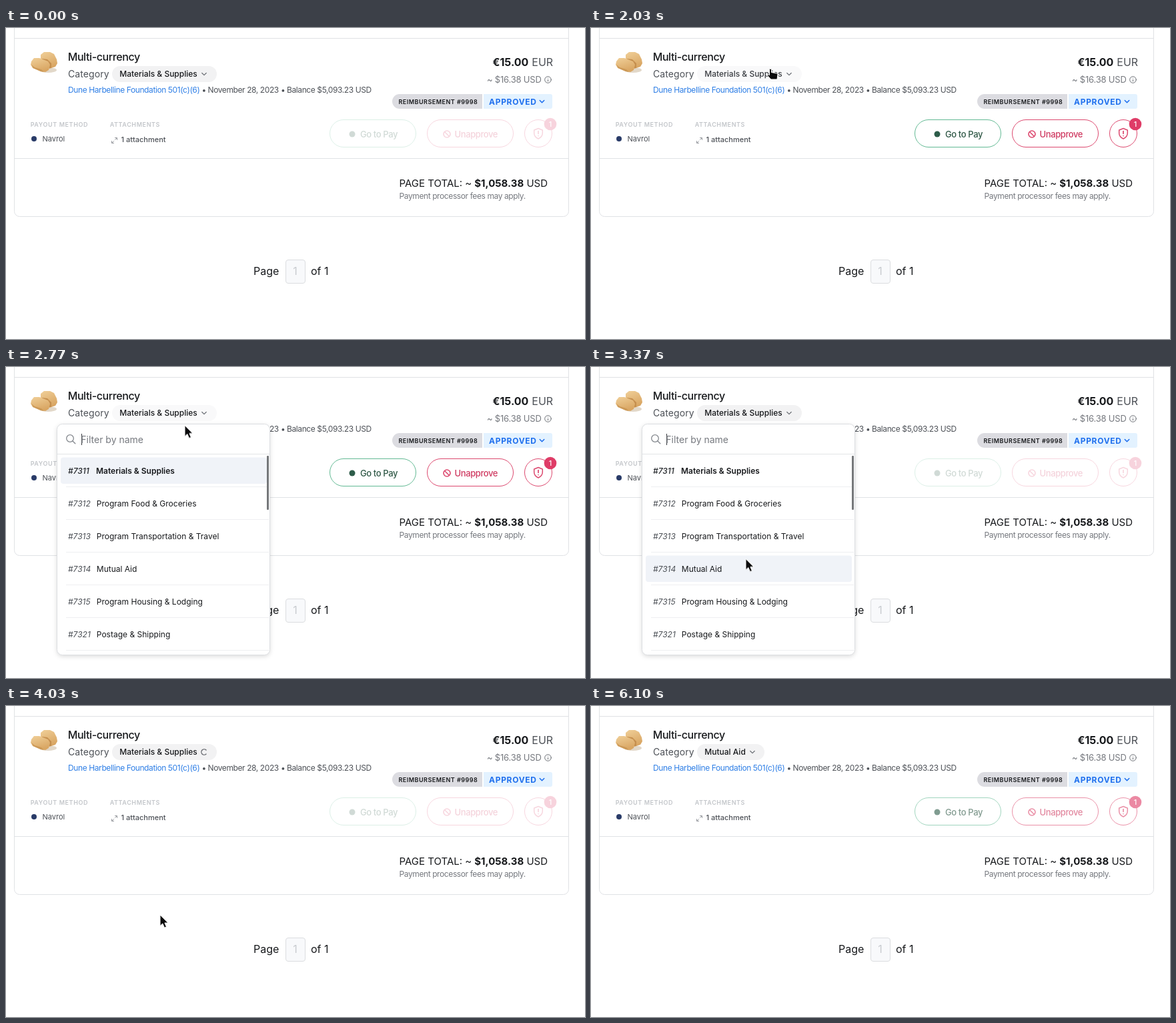
These frames come from a looping animation (868x466 px, 6.17 s). An HTML page:

```html
<!DOCTYPE html>
<html lang="en">
<head>
<meta charset="utf-8">
<title>Expense category</title>
<style>
html, body { margin: 0; width: 100%; height: 100%; overflow: hidden; background: #fff; }
svg { display: block; width: 868px; height: 466px; font-family: Inter, "Liberation Sans", sans-serif; fill: #17191c; }
text { white-space: pre; }
.s9 { font-size: 9px; font-weight: 600; }
.s11 { font-size: 11px; }
.s12 { font-size: 12px; }
.s13 { font-size: 13px; }
.s14 { font-size: 14px; }
.s15 { font-size: 15px; }
.s16 { font-size: 16px; }
.tight { letter-spacing: -.4px; }
.med { font-weight: 500; }
.semi { font-weight: 600; }
.bold { font-weight: 700; }
.grey { fill: #4d5157; }
.soft { fill: #76797f; }
.label { fill: #c3c6ca; letter-spacing: .6px; }
.line { fill: none; stroke: #e0e2e5; }
.icon { fill: none; stroke-linecap: round; stroke-linejoin: round; }
.red { fill: none; stroke: #dc486e; }
.redText { fill: #cf3a61; }
.code { font-style: italic; fill: #4d5157; }

/* every part shares one 6.17 s clock */
.a { animation: 6.17s step-end infinite; }
.buttons { animation-name: fade; }
.wide { animation-name: wide; }
.pill { fill: #f2f2f3; animation-name: pill; }
.press { animation-name: press; }
.chev { animation-name: chev; }
.load { animation-name: load; }
.spin { animation-name: spin; animation-timing-function: linear; }
.next { animation-name: next; }
.menu { animation-name: menu; }
.hover { fill: #f0f3f8; animation-name: hover; }
.move { animation-name: move; }
.arrow { animation-name: arrow; }
.hand { animation-name: hand; }

@keyframes fade {
  0% { opacity: .22; }
  23.1% { opacity: .22; animation-timing-function: steps(4); }
  27.5% { opacity: 1; }
  45.8% { opacity: 1; animation-timing-function: steps(7); }
  53.4% { opacity: .22; }
  69.65% { opacity: .22; animation-timing-function: steps(3); }
  72.9% { opacity: 1; }
  96.74% { opacity: .85; }
  98.85%, 100% { opacity: .6; }
}
@keyframes wide { 0% { opacity: 1; } 70.8%, 100% { opacity: 0; } }
@keyframes next { 0% { opacity: 0; } 70.8%, 100% { opacity: 1; } }
@keyframes pill { 0% { fill: #f2f2f3; } 27.5% { fill: #f9f9fa; } 52.3%, 100% { fill: #f2f2f3; } }
@keyframes press { 0% { fill: #17191c; } 32.88% { fill: #3a3d42; } 36.13%, 100% { fill: #17191c; } }
@keyframes chev { 0% { opacity: 1; } 61%, 100% { opacity: 0; } }
@keyframes load { 0% { opacity: 0; } 61%, 100% { opacity: 1; } }
@keyframes spin { from { transform: rotate(-81deg); } to { transform: rotate(2799deg); } }
@keyframes menu {
  0% { opacity: 0; }
  36.13% { opacity: .5; }
  37.26% { opacity: .88; }
  38.4% { opacity: 1; }
  59.95% { opacity: .5; }
  61%, 100% { opacity: 0; }
}
@keyframes hover {
  0% { transform: none; }
  49.2% { transform: translateY(49px); }
  50.25% { transform: translateY(98px); }
  52.3%, 100% { transform: translateY(147px); }
}
@keyframes move {
  0% { transform: translate(250px, 351px); }
  21.06% { transform: translate(250px, 351px); animation-timing-function: steps(6); }
  27.5% { transform: translate(268px, 61px); }
  44.88% { transform: translate(268px, 87.5px); animation-timing-function: steps(7); }
  52.3% { transform: translate(232px, 287.5px); }
  59.95% { transform: translate(232px, 287.5px); animation-timing-function: steps(5); }
  65.3%, 100% { transform: translate(231px, 313px); }
}
@keyframes arrow {
  0% { opacity: 0; }
  21.06% { opacity: 1; }
  27.5% { opacity: 0; }
  44.88% { opacity: 1; }
  96.74%, 100% { opacity: 0; }
}
@keyframes hand { 0% { opacity: 0; } 27.5% { opacity: 1; } 44.88%, 100% { opacity: 0; } }
</style>
</head>
<body>
<svg viewBox="0 0 868 466">
  <defs>
    <linearGradient id="crust" x1="0" y1="0" x2=".4" y2="1">
      <stop offset="0" stop-color="#f0cf98"/>
      <stop offset="1" stop-color="#d9a663"/>
    </linearGradient>
    <path id="chevron" class="icon" d="M-3.2-1.5L0 1.7 3.2-1.5"/>
  </defs>

  <path class="line" d="M12.5 0V274.500a8 8 0 0 0 8 8H835.500a8 8 0 0 0 8-8V0M13 15.500H843M13 195.500H843"/>

  <ellipse cx="63" cy="63" rx="13" ry="4" fill="#e2d8c9"/>
  <path fill="url(#crust)" d="M52 40l5-4 9 0 6 3 4 8 1 6-3 5-9 3-13-12z"/>
  <path fill="#c58f4e" d="M54 46l8 1 6 6 0 7-5 0-9-8z"/>
  <path fill="url(#crust)" d="M38 50l4-5 8 0 13 5 3 5-2 8-5 3-7-1-12-5-3-5z"/>
  <path fill="#cc9957" d="M38 55l5 4 10 3 4 4-5-1-11-5z"/>

  <text class="s16 med tight" x="92.700" y="49">Multi-currency</text>
  <text class="s14 grey" x="93" y="74" letter-spacing=".1">Category</text>

  <g class="a wide">
    <rect class="a pill" x="159" y="57" width="157" height="24" rx="12"/>
    <text class="a press s12 med" x="170.300" y="73">Materials &amp; Supplies</text>
    <g class="a chev"><use href="#chevron" x="297" y="69" stroke="#6b6f75" stroke-width="1.200"/></g>
    <g class="a load"><g transform="translate(297 69)">
      <path class="a spin icon" d="M3-3A4.200 4.200 0 1 0 3 3" stroke="#5d6066" stroke-width="1.300"/>
    </g></g>
  </g>
  <g class="a next">
    <rect x="159" y="57" width="101" height="24" rx="12" fill="#f2f2f3"/>
    <text class="s12 med" x="170.300" y="73">Mutual Aid</text>
    <use href="#chevron" x="242" y="69" stroke="#6b6f75" stroke-width="1.200"/>
  </g>

  <g class="s12 tight grey">
    <text x="93" y="97" fill="#2f7fe6">Dune Harbelline Foundation 501(c)(6)</text>
    <text x="293.500" y="97">•</text>
    <text x="302.500" y="97">November 28, 2023</text>
    <text x="412" y="97">•</text>
    <text x="421" y="97">Balance $5,093.23 USD</text>
  </g>

  <text class="s16 bold" x="729.500" y="57">€15.00</text>
  <text class="s16 grey" x="788.300" y="57">EUR</text>
  <text class="s13 soft" x="721" y="82" letter-spacing="-.2">~ $16.38 USD</text>
  <g class="icon" stroke="#6a6e74">
    <circle cx="812.500" cy="77.500" r="4.800"/>
    <path d="M812.500 77.500v2.300M812.500 75.100v.1"/>
  </g>

  <path fill="#dcdce1" d="M714 99v22H590a11 11 0 0 1 0-22z"/>
  <text class="s9" x="588.400" y="114" letter-spacing=".5">REIMBURSEMENT #9998</text>
  <path fill="#e3f2ff" d="M716 99H816a3 3 0 0 1 3 3V118a3 3 0 0 1-3 3H716z"/>
  <text class="s12 bold" x="724" y="115" fill="#2070ee" letter-spacing=".7">APPROVED</text>
  <use href="#chevron" x="803.500" y="110" stroke="#2070ee" stroke-width="1.600"/>

  <text class="s9 label" x="36.700" y="148">PAYOUT METHOD</text>
  <text class="s9 label" x="155.700" y="148">ATTACHMENTS</text>
  <circle cx="42" cy="166" r="4" fill="#293b68"/>
  <text class="s11 grey" x="54.500" y="170.300">Navrol</text>
  <path class="icon" stroke="#96999e" d="M163.500 164.500H166.500V167.500M166 165L163.500 167.500M158.500 169.500V172.500H161.500M159 172L161.500 169.500"/>
  <text class="s11 med grey" x="172.500" y="171">1 attachment</text>

  <g class="a buttons">
    <rect x="485.500" y="137.500" width="129" height="41" rx="20.500" fill="none" stroke="#62b993"/>
    <circle cx="519" cy="159" r="4.500" fill="#2d5c49"/>
    <text class="s13 med tight" x="531" y="164" fill="#305947">Go to Pay</text>

    <rect class="red" x="631.500" y="137.500" width="129" height="41" rx="20.500"/>
    <circle class="red" cx="661" cy="159" r="5" stroke-width="1.600"/>
    <path class="red" d="M657.500 155.500l7 7" stroke-width="1.600"/>
    <text class="s13 med tight redText" x="672.500" y="164">Unapprove</text>

    <circle class="red" cx="798" cy="158" r="20.500"/>
    <path class="red" stroke-width="1.500" stroke-linejoin="round" d="M798 150.500l6.300 2.500v4.500q0 5.500-6.300 8.500-6.300-3-6.300-8.500V153z"/>
    <path class="icon" stroke="#d93a64" stroke-width="1.600" d="M798 154.500v4M798 161.500v.1"/>
    <circle cx="816" cy="144" r="9.300" fill="#df3c67"/>
    <text class="s11 med" x="816" y="148" fill="#fff" text-anchor="middle">1</text>
  </g>

  <text class="s15" x="589.500" y="238">PAGE TOTAL: ~</text>
  <text class="s15 bold" x="702.300" y="238">$1,058.38</text>
  <text class="s15" x="780.400" y="238">USD</text>
  <text class="s12 tight soft" x="589.500" y="256">Payment processor fees may apply.</text>

  <g class="s16">
    <text x="371" y="370">Page</text>
    <rect x="419.500" y="347.500" width="29" height="35" rx="3.500" fill="#f8f9fb" stroke="#dbdde0"/>
    <text x="433.500" y="370" fill="#c8cbcf" text-anchor="middle">1</text>
    <text x="457" y="370">of 1</text>
  </g>

  <g class="a menu">
    <rect x="76.500" y="85.500" width="319" height="346" rx="8" fill="#fff" stroke="#dcdee1" style="filter:drop-shadow(0 2px 3px #0002)"/>
    <g class="icon" stroke="#83878d" stroke-width="1.300">
      <circle cx="96" cy="107" r="5.300"/>
      <path d="M100 111l3.800 3.800"/>
    </g>
    <path stroke="#33363a" d="M113.500 100V117"/>
    <text class="s14 soft" x="112.300" y="114">Filter by name</text>
    <path class="line" stroke-width=".9" d="M77 130.500H395"/>
    <path fill="none" stroke="#eeeff1" d="M90 179.500H394M90 228.500H394M90 277.500H394M90 326.500H394M90 375.500H394M90 424.500H394"/>
    <rect class="a hover" x="82" y="135.500" width="309" height="39.500" rx="4"/>
    <rect x="391" y="133" width="3" height="81" rx="1" fill="#75777a"/>
    <g class="s12">
      <text class="code med" x="93" y="160" style="fill:#24272b">#7311</text>
      <text class="semi" x="135" y="160">Materials &amp; Supplies</text>
      <text class="code" x="93" y="209">#7312</text>
      <text x="135.800" y="209">Program Food &amp; Groceries</text>
      <text class="code" x="93" y="258">#7313</text>
      <text x="135.800" y="258">Program Transportation &amp; Travel</text>
      <text class="code" x="93" y="307">#7314</text>
      <text x="135.800" y="307">Mutual Aid</text>
      <text class="code" x="93" y="356">#7315</text>
      <text x="135.800" y="356">Program Housing &amp; Lodging</text>
      <text class="code" x="93" y="405">#7321</text>
      <text x="135.800" y="405">Postage &amp; Shipping</text>
    </g>
  </g>

  <g class="a move" fill="#0b0b0c" stroke="#fff" stroke-linejoin="round">
    <path class="a arrow" d="M0 0V16.500L3.800 13l2.700 6.200 3-1.300L6.900 12H12z"/>
    <path class="a hand" d="M-.5 1.300c0-1.700 3-1.700 3 0v4.200l7 1.300c1.800.4 2.600 1.300 2.400 2.800l-.9 6.400H1.800L-3 10.800c-1-1.200.4-2.600 1.600-1.800l.9.700z"/>
  </g>
</svg>
</body>
</html>
```
